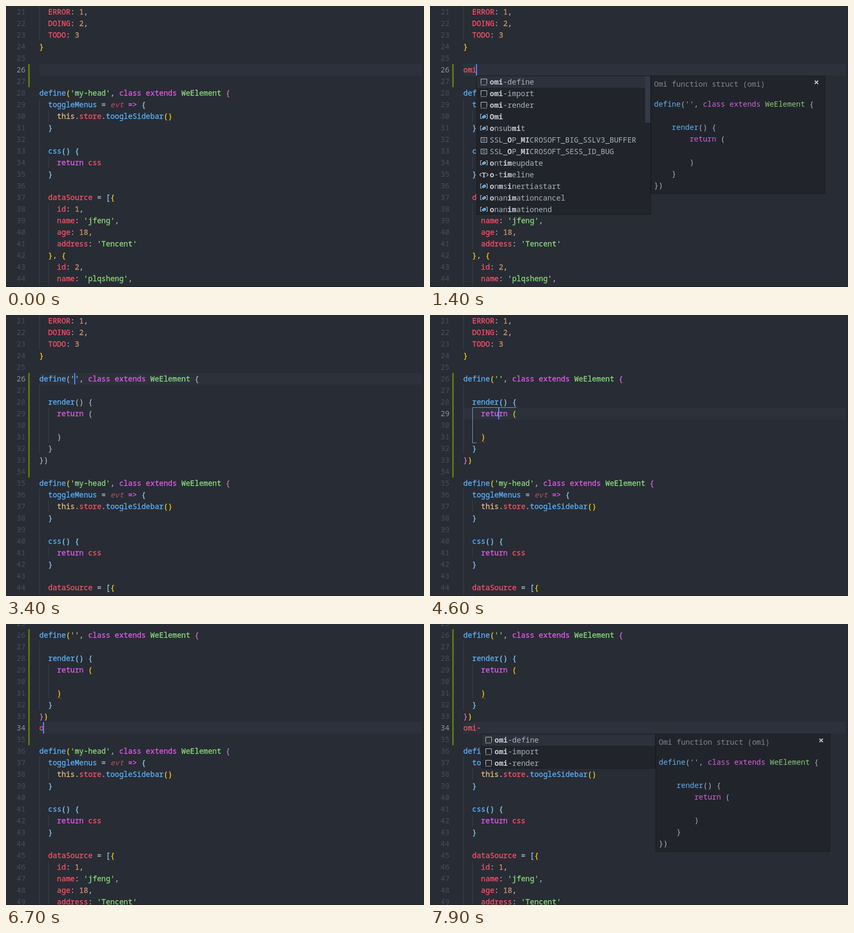
An HTML page with a canvas for the animation above (8000 ms loop, 791 by 533 pixels).

```html
<!DOCTYPE html>
<html lang="en">
<head>
<meta charset="utf-8">
<title>Editor snippets</title>
<style>
  html, body { margin: 0; width: 100%; height: 100%; overflow: hidden; background: #282c34; }
  canvas { display: block; }
</style>
</head>
<body>
<canvas id="stage" width="791" height="533"></canvas>
<script>
const ctx = document.getElementById('stage').getContext('2d');
const W = 791, H = 533, LOOP = 8000;
const CHAR = 8.4, ROW = 22, LEFT = 63, FIRST = 21;
const FAMILY = '"Noto Sans Mono", "DejaVu Sans Mono", monospace';

const C = {
  bg: '#282c34', line: '#2c313c', guide: '#3b4048', number: '#474e5b', active: '#8d939f',
  text: '#abb2bf', cursor: '#528bff', change: '#587c0c',
  panel: '#21252b', border: '#181a1f', bold: '#c6c9cf', dim: '#83878f', slider: '#343a45',
  match: '#515a6b', error: '#c24038', icon: '#c5c5c5', cube: '#75beff'
};
const SOFT = {
  text: C.text, red: '#ef596f', blue: '#61afef', purple: '#d55fde', green: '#89ca78',
  orange: '#d19a66', yellow: '#e5c07b', param: '#b3535f'
};
const VIVID = { ...SOFT, red: '#fb5166', blue: '#5ab2fb', purple: '#e25bec', green: '#8bdc7c' };
const BRACKETS = ['#ffd700', '#da70d6', '#87cefa'];
const KEYWORDS = new Set(['class', 'extends', 'return', 'import', 'from']);

const HEAD = ['  ERROR: 1,', '  DOING: 2,', '  TODO: 3', '}', ''];
const SNIPPET = [
  "define('', class extends WeElement {", '', '  render() {', '    return (', '', '    )', '  }', '})'
];
const TAIL = `
define('my-head', class extends WeElement {
  toggleMenus = evt => {
    this.store.toogleSidebar()
  }

  css() {
    return css
  }

  dataSource = [{
    id: 1,
    name: 'jfeng',
    age: 18,
    address: 'Tencent'
  }, {
    id: 2,
    name: 'plqsheng',
    age: 18,`.split('\n');

// Each entry: kind letter, then the label with matched letters between asterisks.
const snippetItems = m => ['define', 'import', 'render'].map(n => 's' + m + n);
const LISTS = {
  om: { slider: 52, items: [...snippetItems('*om*i-'), 'v*Om*i',
    ...['essage', 'essageerror', 'ousedown', 'ouseenter', 'ouseleave', 'ousemove', 'ouseout', 'ouseover']
      .map(n => 'v*o*n*m*' + n)] },
  omi: { slider: 88, items: [...snippetItems('*omi*-'), 'v*Omi*', 'v*o*nsub*mi*t',
    'cSSL_*O*P_*MI*CROSOFT_BIG_SSLV3_BUFFER', 'cSSL_*O*P_*MI*CROSOFT_SESS_ID_BUG',
    'v*o*nt*im*eupdate', 't*o*-t*im*eline', 'v*o*n*m*s*i*nertiastart',
    'v*o*nan*im*ationcancel', 'v*o*nan*im*ationend'] },
  dash: { slider: 0, items: snippetItems('*omi*-') }
};
const DOCS = [
  { title: 'Omi function struct (omi)', code: ["define('', class extends WeElement {", '',
    '    render() {', '        return (', '', '        )', '    }', '})'] },
  { title: 'Omi module (omi)', code: ['import { define, WeElement,', "extractClass } from 'omi'"] },
  { title: 'Omi render struct (omi)', code: ['render() {', '    return (', '', '    )', '}'] }
];

const SCOPES = {
  paren: { top: 26, left: 0, right: 7, bottom: 33, end: 2, color: BRACKETS[0] },
  body: { top: 26, left: 0, right: 36, bottom: 33, end: 1, color: BRACKETS[1] },
  render: { top: 28, left: 2, right: 12, bottom: 32, end: 3, color: BRACKETS[2] }
};

const type = (typed, extra) => ({ typed, col: typed.length, cursor: true, ...extra });
const TIMELINE = [
  [0, { typed: '', snippet: false, row: 26, col: 0, cursor: false, scroll: 0, list: null,
        pick: 0, scope: null, error: false, match: false, colored: true }],
  [400, { cursor: true }],
  [900, { cursor: false }],
  [1100, type('o')],
  [1200, type('om')],
  [1300, { list: 'om' }],
  [1400, type('omi', { list: 'omi' })],
  [1700, type('omi-', { list: 'dash' })],
  [2100, { cursor: false }],
  [2200, { pick: 1 }],
  [2400, { pick: 2 }],
  [2600, { pick: 1, cursor: true }],
  [2800, { pick: 0 }],
  [3100, { cursor: false }],
  [3400, { typed: null, snippet: true, list: null, col: 8, cursor: true, colored: false }],
  [3600, { colored: true }],
  [3700, { scope: 'paren' }],
  [3800, { error: true, cursor: false }],
  [4200, { row: 27, col: 0, cursor: true }],
  [4300, { scope: 'body' }],
  [4400, { row: 28, col: 8 }],
  [4500, { row: 29 }],
  [4600, { scope: 'render' }],
  [4900, { cursor: false }],
  [5100, { scroll: 50 }],
  [5200, { scroll: 100 }],
  [5400, { cursor: true }],
  [5700, { row: 33, col: 2, scope: null }],
  [5800, { match: true }],
  [6200, { typed: '', row: 34, col: 0 }],
  [6300, { match: false }],
  [6700, type('o')],
  [6800, type('om')],
  [6900, { list: 'om' }],
  [7100, type('omi', { list: 'omi' })],
  [7400, type('omi-', { list: 'dash' })],
  [7900, { cursor: false }]
];

const stateAt = t => Object.assign({}, ...TIMELINE.filter(([at]) => at <= t).map(([, change]) => change));

function rect(x, y, w, h, color) {
  ctx.fillStyle = color;
  ctx.fillRect(x, y, w, h);
}

function text(str, x, y, color, style = '', thicken = 0) {
  ctx.font = `${style} 14px ${FAMILY}`;
  ctx.fillStyle = ctx.strokeStyle = color;
  ctx.fillText(str, x, y);
  if (thicken) {
    ctx.lineWidth = thicken;
    ctx.strokeText(str, x, y);
  }
}

function stroke(points, color, width = 1) {
  ctx.strokeStyle = color;
  ctx.lineWidth = width;
  ctx.beginPath();
  points.forEach(([x, y]) => ctx.lineTo(x, y));
  ctx.stroke();
}

function tokenKind(token, rest) {
  if (token[0] === "'") return 'green';
  if (/^\d/.test(token)) return 'orange';
  if (token === '=>' || KEYWORDS.has(token)) return 'purple';
  if (token === 'WeElement') return rest[0] === ',' ? 'red' : 'green';
  if (token === 'this') return 'yellow';
  if (token === 'evt') return 'param';
  if (/^\w/.test(token)) return rest[0] === '(' || token === 'toggleMenus' ? 'blue' : 'red';
  return token === '-' ? 'red' : 'text';
}

// Draws one line of code; editor lines pass nest, which tracks bracket depth.
function codeLine(line, x, y, nest) {
  const palette = nest ? VIVID : SOFT;
  for (const m of line.matchAll(/'[^']*'|=>|\w+|[^\s\w]/g)) {
    const token = m[0];
    let color = palette[tokenKind(token, line.slice(m.index + token.length))];
    if (nest && /[()[\]{}]/.test(token)) {
      const opens = '([{'.includes(token);
      const depth = opens ? nest.depth++ : --nest.depth;
      if (nest.colored) color = BRACKETS[depth % 3];
    }
    const italic = token === 'evt';
    text(token, x + m.index * CHAR, y, color, italic ? 'italic' : '', nest && !italic ? .3 : 0);
  }
}

const indentOf = line => line.search(/\S/) / 2;

function guideCount(lines, i) {
  if (lines[i]) return indentOf(lines[i]);
  let a = i, b = i;
  while (a > 0 && !lines[a]) a--;
  while (b < lines.length - 1 && !lines[b]) b++;
  const before = indentOf(lines[a]), after = indentOf(lines[b]);
  return before === after ? before : Math.min(before, after) + 1;
}

const edge = col => Math.round(LEFT + col * CHAR);

function drawEditor(s) {
  const lines = [...HEAD, ...(s.snippet ? SNIPPET : []), ...(s.typed === null ? [] : [s.typed]), ...TAIL];
  const rowY = n => (n - FIRST) * ROW - s.scroll;
  const nest = { depth: 1, colored: true };

  rect(63, rowY(s.row), 724, ROW, C.line);
  if (s.match) {
    rect(edge(6), rowY(26), 9, ROW, C.match);
    rect(edge(1), rowY(33), 9, ROW, C.match);
  }
  lines.forEach((line, i) => {
    const n = FIRST + i, y = rowY(n);
    for (let g = 0; g < guideCount(lines, i); g++) rect(edge(g * 2), y, 1, ROW, C.guide);
    text(n, 20, y + 16, n === s.row ? C.active : C.number);
    nest.colored = s.colored || n < 26 || n > 33;
    codeLine(line, LEFT, y + 16, nest);
  });

  const changed = (s.snippet ? 8 : 0) + (s.typed === null ? 0 : 1) + 1;
  rect(42, rowY(26), 3, changed * ROW, C.change);

  if (s.error) {
    const y = rowY(31) + 21;
    stroke([[97, y], [99, y - 2], [102, y + 1], [105, y - 2]], C.error);
  }
  if (s.scope) {
    const { top, left, right, bottom, end, color } = SCOPES[s.scope];
    const x = edge(left) + .5, y1 = rowY(top + 1) - .5, y2 = rowY(bottom) + .5;
    ctx.globalAlpha = .7;
    stroke([[edge(right), y1], [x, y1], [x, y2], [edge(end), y2]], color);
    ctx.globalAlpha = 1;
  }
  if (s.cursor) rect(Math.max(63, edge(s.col) - 1), rowY(s.row), 2, ROW, C.cursor);
}

// Icons are drawn around their centre.
const ICONS = {
  s() {
    stroke([[-5.5, 4], [-5.5, -5.5], [5.5, -5.5], [5.5, 4]], C.icon);
    for (let x = -6; x <= 5; x += 2) rect(x, 5, 1, 1.5, C.icon);
  },
  v() {
    for (const d of [-1, 1]) stroke([[d * 4, -4.5], [d * 6.5, -4.5], [d * 6.5, 3.5], [d * 4, 3.5]], C.icon);
    ctx.fillStyle = C.cube;
    ctx.beginPath();
    [[-4, 0], [1, -3.5], [4, -2], [4, 1], [-1, 3.5], [-4, 2]].forEach(([x, y]) => ctx.lineTo(x, y));
    ctx.fill();
    stroke([[-3, .2], [-.8, 1.2], [3, -1.2]], C.panel, .6);
  },
  c() {
    ctx.strokeStyle = C.icon;
    ctx.lineWidth = 1;
    ctx.strokeRect(-5.5, -4.5, 11, 9);
    rect(-3, -2, 6, 1, C.cube);
    rect(-3, 1, 6, 1, C.cube);
  },
  t() {
    for (const d of [-1, 1]) stroke([[d * 5, -3], [d * 8, 0], [d * 5, 3]], C.icon, 1.2);
    rect(-4, -4, 8, 1.5, C.icon);
    rect(-1, -4, 2, 9, C.icon);
    rect(-2.5, 4, 5, 1, C.icon);
  }
};

function panel(x, y, w, h) {
  rect(x, y, w, h, C.border);
  rect(x + 1, y + 1, w - 2, h - 2, C.panel);
}

function drawList(s, x, y) {
  const { items, slider } = LISTS[s.list];
  const h = items.length * ROW;
  panel(x, y, 330, h);
  ctx.save();
  ctx.beginPath();
  ctx.rect(x + 1, y + 1, 328, h - 2);
  ctx.clip();
  rect(x + 1, y + 1 + s.pick * ROW, 328, ROW, C.line);
  items.forEach((item, i) => {
    const top = y + 1 + i * ROW;
    ctx.save();
    ctx.translate(x + 14, top + 11);
    ICONS[item[0]]();
    ctx.restore();
    let tx = x + 25;
    item.slice(1).split('*').forEach((part, k) => {
      text(part, tx, top + 16, k % 2 ? C.bold : C.text, k % 2 ? 'bold' : '');
      tx += part.length * CHAR;
    });
  });
  rect(x + 319, y + 1, 10, slider, C.slider);
  ctx.restore();
}

function drawDoc(s, x, y) {
  const { title, code } = DOCS[s.pick];
  panel(x, y, 330, 4 + (code.length + 2) * ROW);
  text(title, x + 6, y + 21, C.dim);
  stroke([[x + 310, y + 9.5], [x + 316.5, y + 16]], C.bold, 1.8);
  stroke([[x + 316.5, y + 9.5], [x + 310, y + 16]], C.bold, 1.8);
  code.forEach((line, i) => codeLine(line, x + 6, y + 59 + i * ROW));
}

function frame(now) {
  const s = stateAt(now % LOOP);
  rect(0, 0, W, H, C.bg);
  drawEditor(s);
  rect(789, 0, 2, H, '#252930');
  rect(0, H - 1, W, 1, '#1f2329');
  if (s.list) {
    const x = edge(s.col), y = (s.row - FIRST + 1) * ROW - s.scroll;
    drawDoc(s, x + 330, y);
    drawList(s, x, y);
  }
}

const start = performance.now();
(function tick() {
  frame(performance.now() - start);
  requestAnimationFrame(tick);
})();
</script>
</body>
</html>
```
